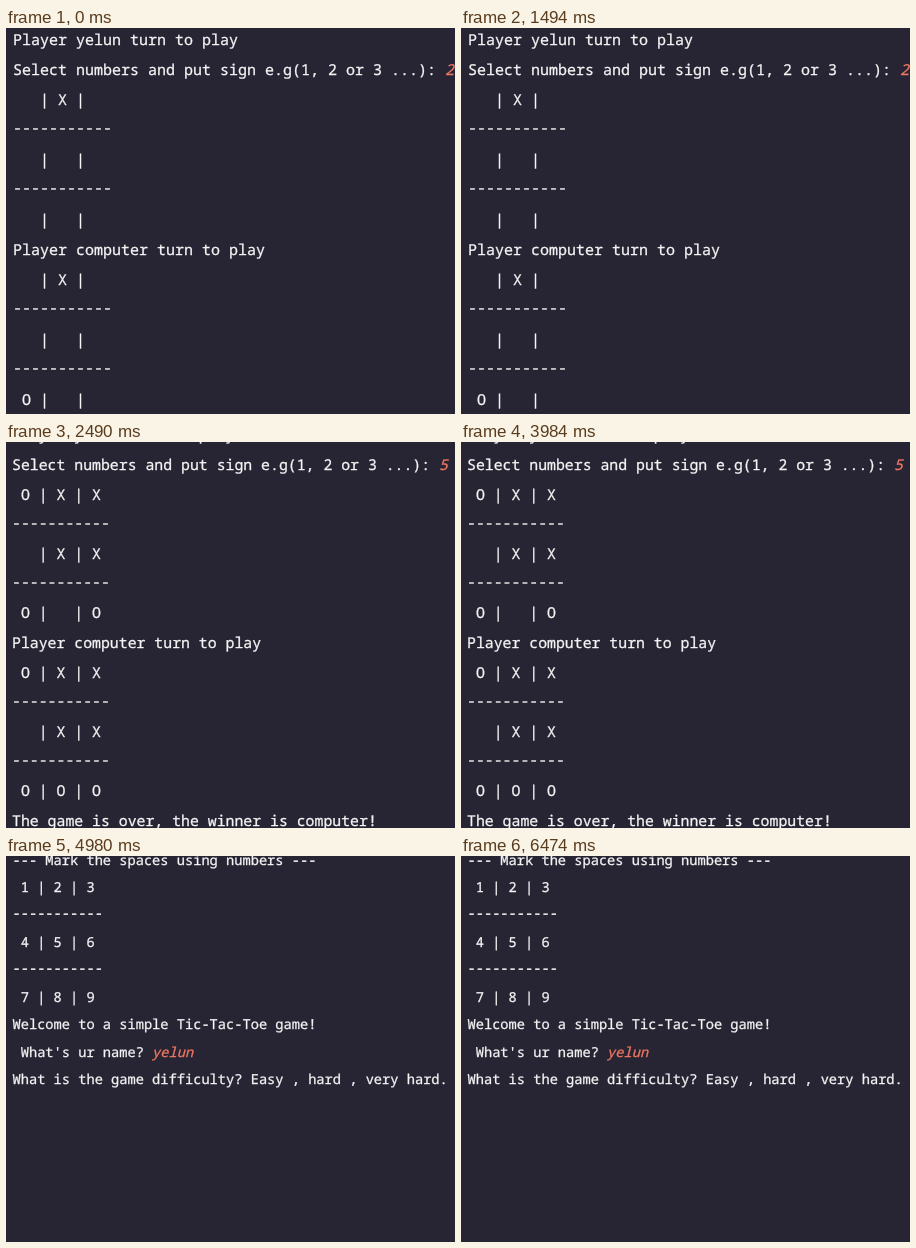
Recreate the animation shown at these times as an HTML page with a canvas. Size 449 px wide and 386 px high, loop 7470 ms.

```html
<!DOCTYPE html>
<html lang="en">
<head>
<meta charset="utf-8">
<title>Tic-Tac-Toe terminal</title>
<style>
  html, body { margin: 0; width: 100%; height: 100%; overflow: hidden; background: #272433; }
  canvas { display: block; }
</style>
</head>
<body>
<canvas id="stage" width="449" height="386"></canvas>
<script>
const ctx = document.getElementById('stage').getContext('2d');
const HOLD = 2490;
const PLAYER = 'yelun';
const RULE = '-'.repeat(11);

// Nine cells become five rows of terminal text.
const board = cells => [0, 3, 6]
  .map(i => ' ' + [...cells.slice(i, i + 3)].join(' | '))
  .flatMap((row, i) => i ? [RULE, row] : [row]);

const turn = name => `Player ${name} turn to play`;
const ask = answer => `Select numbers and put sign e.g(1, 2 or 3 ...): ~${answer}`;

// Text after "~" is typed user input.
const scenes = [
  { x: 7, y: 17, pitch: 30, size: 15, rows: [
    turn(PLAYER), ask(2), ...board(' X       '),
    turn('computer'), ...board(' X    O  ')] },
  { x: 6, y: -1.6, pitch: 29.65, size: 14.83, rows: [
    turn(PLAYER), ask(5), ...board('OXX XXO O'),
    turn('computer'), ...board('OXX XXOOO'),
    'The game is over, the winner is computer!'] },
  { x: 6.5, y: 9, pitch: 27.4, size: 13.7, rows: [
    '--- Mark the spaces using numbers ---', ...board('123456789'),
    'Welcome to a simple Tic-Tac-Toe game!',
    ` What's ur name? ~${PLAYER}`,
    'What is the game difficulty? Easy , hard , very hard.'] },
];

// A hairline outline gives the slightly heavier terminal weight.
function write(text, x, y, color) {
  ctx.fillStyle = ctx.strokeStyle = color;
  ctx.fillText(text, x, y);
  ctx.strokeText(text, x, y);
}

function drawScene({ x, y, pitch, size, rows }) {
  const font = `${size}px "Noto Sans Mono", monospace`;
  ctx.fillStyle = '#272433';
  ctx.fillRect(0, 0, 449, 386);
  ctx.textRendering = 'geometricPrecision';
  ctx.lineWidth = 0.3;
  ctx.lineJoin = 'round';
  rows.forEach((row, i) => {
    const [output, input] = row.split('~');
    const baseline = y + i * pitch - (row === RULE ? 1.7 : 0);
    ctx.font = font;
    write(output, x, baseline, '#f4f4f4');
    if (!input) return;
    const inputX = x + ctx.measureText(output).width;
    ctx.font = 'italic ' + font;
    write(input, inputX, baseline, '#ee7762');
  });
}

function tick() {
  drawScene(scenes[Math.floor(performance.now() / HOLD) % scenes.length]);
  requestAnimationFrame(tick);
}
tick();
</script>
</body>
</html>
```
